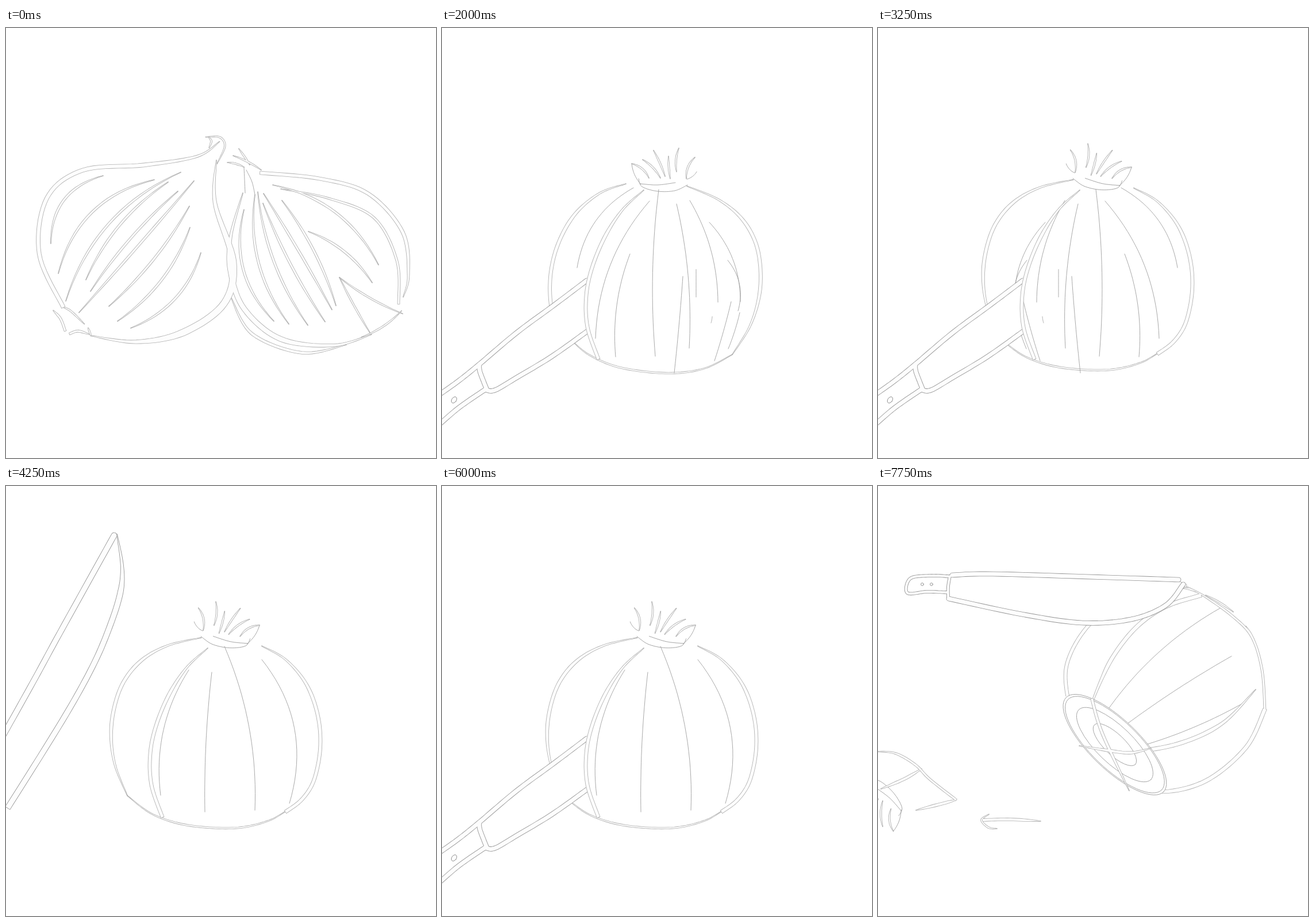
Recreate the animation shown at these times as an HTML page. Size 748 by 748 pixels, loop 8000 ms.

```html
<!DOCTYPE html>
<html lang="en">
<head>
<meta charset="utf-8">
<title>Cutting an onion</title>
<style>
html, body { margin: 0; width: 100%; height: 100%; overflow: hidden; background: #fff; }
svg { display: block; width: 100vw; height: 100vh; }
path, ellipse { fill: none; stroke-linejoin: round; stroke-linecap: round; }
.line { stroke: #a0a0a0; stroke-width: .9; }
.edge { stroke: #b0b0b0; stroke-width: 1.7; }
.skin { fill: #fdfdfd; }
.steel .line { stroke: #8c8c8c; }
.steel .edge { stroke: #939393; }
.body { fill: #fff; }
</style>
</head>
<body>
<svg id="stage" viewBox="0 0 748 748"></svg>
<script>
const stage = document.getElementById('stage');
const groups = {};
const STEP = 250, LOOP = 8000;

function parse(text) {
  const n = text.split(' ').map(Number), pts = [];
  for (let i = 0; i < n.length; i += 2) pts.push([n[i], n[i + 1]]);
  return pts;
}

// Catmull-Rom samples through a few key points
function curve(text) {
  const p = parse(text), out = [], last = p.length - 1;
  for (let i = 0; i < last; i++) {
    const a = p[Math.max(0, i - 1)], b = p[i], c = p[i + 1], d = p[Math.min(last, i + 2)];
    for (let k = 0; k < 10; k++) {
      const t = k / 10;
      out.push([0, 1].map(j => b[j] + .5 * t * (c[j] - a[j] +
        t * (2 * a[j] - 5 * b[j] + 4 * c[j] - d[j] + t * (3 * (b[j] - c[j]) + d[j] - a[j])))));
    }
  }
  return out.concat([p[last]]);
}

// chord bent sideways by a share of its length
function bend(text, bow) {
  const [[x, y], [u, v]] = parse(text), out = [];
  for (let k = 0; k <= 20; k++) {
    const t = k / 20, off = 4 * bow * t * (1 - t);
    out.push([x + (u - x) * t + (v - y) * off, y + (v - y) * t - (u - x) * off]);
  }
  return out;
}

const toPath = pts => 'M' + pts.map(p => p[0].toFixed(1) + ' ' + p[1].toFixed(1)).join('L');

// ends: 's' narrows the start, 'e' the end
function ribbon(pts, width, ends) {
  const n = pts.length - 1, left = [], right = [];
  pts.forEach((p, i) => {
    const a = pts[Math.max(0, i - 1)], b = pts[Math.min(n, i + 1)];
    const dx = b[0] - a[0], dy = b[1] - a[1], len = Math.hypot(dx, dy) || 1;
    let r = (width - 1) / 2;
    if (ends.includes('s')) r *= Math.min(1, i / n * 3);
    if (ends.includes('e')) r *= Math.min(1, (n - i) / n * 3);
    left.push([p[0] - dy / len * r, p[1] + dx / len * r]);
    right.unshift([p[0] + dy / len * r, p[1] - dx / len * r]);
  });
  return toPath(left.concat(right)) + 'Z';
}

// all edges lie under all skins, so bands that touch flow together
function group(name, draw, cls = '') {
  const layer = { body: '', line: '', edge: '', skin: '' };
  let turn = '';
  const put = (kind, d, style = '') =>
    layer[kind] += `<path class="${kind}" d="${d}" transform="${turn}" style="${style}"/>`;
  const strip = (pts, width, ends) => {
    const d = ends ? ribbon(pts, width, ends) : toPath(pts);
    put('edge', d, ends ? '' : `stroke-width:${width + .7}`);
    put('skin', d, ends ? '' : `fill:none;stroke:#fdfdfd;stroke-width:${width - 1}`);
  };
  const g = {
    body: d => put('body', `M${d}Z`),
    line: (...all) => all.forEach(t => put('line', toPath(curve(t)))),
    band: (width, ends, ...all) => all.forEach(t => strip(curve(t), width, ends)),
    // the bow runs evenly from the first rib to the last
    fan: (width, from, to, ...all) => all.forEach((t, i) => {
      const pts = bend(t, from + (to - from) * i / Math.max(1, all.length - 1));
      if (width) strip(pts, width, 'se');
      else put('line', toPath(pts));
    }),
    ring: (x, y, rx, ry, tilt = 0) => layer.line +=
      `<ellipse class="line body" rx="${rx}" ry="${ry}" transform="translate(${x} ${y}) rotate(${tilt})"/>`,
    at: (transform, part) => { turn = transform; part(g); turn = ''; }
  };
  draw(g);
  stage.insertAdjacentHTML('beforeend', `<g class="${cls}">${Object.values(layer).join('')}</g>`);
  groups[name] = stage.lastElementChild;
}

function bulb(g) {
  g.band(7, 's', '428 164 405 205 330 261 240 318 207 390 240 482 320 545');
  g.band(12, 'se', '438 195 470 262 545 338 565 410 525 488 460 540 385 567');
  g.band(3, 'se', '403 168 425 157 440 167 442 200', '408 166 415 170 417 182',
    '320 545 335 545 366 554', '375 557 386 567');
  g.band(4, 's', '307 558 325 565 342 580', '382 566 362 570 351 581');
}

function crown(g) {
  g.line('342 262 348 276 375 284 405 283 427 273', '345 271 375 273 406 269');
  g.fan(3, .12, -.12, '330 236 360 261', '349 229 380 261', '368 213 388 258',
    '394 223 397 262', '412 209 408 250', '440 225 425 262');
  g.fan(0, -.08, .1, '330 236 346 272', '443 250 426 263');
}

function shell(g) {
  g.band(6, 's', '320 271 275 287 232 323 203 373 189 428 190 485 205 522 229 548');
  g.band(6, 'se', '426 275 480 298 520 330 545 372 554 420 551 470 535 520 505 568');
  g.band(3, 'se', '229 547 255 568 300 588 355 598 410 600 460 591 505 568');
  crown(g);
}

function ribs(g) {
  g.fan(0, -.12, .13, '333 278 235 417', '361 301 267 540', '327 393 302 572', '377 281 371 571',
    '419 432 404 600', '408 306 430 557', '431 300 480 477', '465 338 519 476', '497 404 515 492');
  g.fan(0, 0, .03, '442 420 442 468', '503 476 474 579', '518 495 498 558', '470 502 468 513');
}

group('pair', g => {
  g.at('translate(375 195) rotate(27.5) translate(-430 -160)', bulb);
  g.fan(4, -.19, .12, '169 257 78 375', '258 264 91 427', '304 251 104 475', '282 268 139 438',
    '299 284 147 458', '327 266 127 495', '319 310 179 484', '320 347 194 510', '339 391 217 522');
  g.band(9, 'se', '412 287 391 362 390 420 414 488 478 541 570 552 636 533');
  g.band(5, 'se', '391 468 428 532 515 565 592 551');
  g.band(6, 'e', '442 252 545 262 630 288 690 355 700 430 691 468');
  g.band(4, 's', '478 280 560 296 640 330 680 405 683 480');
  g.fan(4, -.14, .12, '414 316 466 510', '433 290 492 515', '438 285 525 517', '447 305 555 511',
    '448 288 567 490', '480 300 574 483', '526 354 637 443', '464 273 648 412');
  g.fan(3, .06, -.06, '385 234 414 242', '395 222 444 247', '405 210 424 238',
    '580 434 633 530', '580 434 690 497', '618 538 688 492');
  g.line('414 242 416 287', '418 247 428 268 433 290');
});

group('smear', g => {
  g.line('448 177 500 181 600 179 748 181', '415 571 425 568 475 569 600 556 748 544');
  g.fan(0, 0, .08, '533 213 550 516', '608 238 606 523', '723 221 740 490', '672 244 691 514');
});

group('half', g => {
  bulb(g);
  g.fan(0, -.18, .09, '368 269 241 441', '383 243 283 482', '376 310 326 499',
    '393 342 376 451', '450 317 432 497', '488 420 425 545');
});

// the other side is the same onion mirrored and leaning
group('shellA', shell);
group('shellB', g => g.at('translate(367 426) rotate(10) scale(-1 1) translate(-371 -430)', shell));
group('ribsA', ribs);
group('ribsB', g => g.at('translate(756 0) scale(-1 1)', ribs));
group('ribsC', g => g.fan(0, -.09, .13, '318 320 269 538', '358 324 346 567', '380 279 433 564', '445 302 493 552'));

group('knifeIn', g => {
  g.body('-5 637L66 585 130 528 252 437 252 530 92 630 75 628 -5 690');
  g.band(8, '', '-5 638 30 613 66 584 130 530 195 482 252 439', '65 585 66 598 78 629',
    '75 629 92 630 130 608 190 572 252 528', '-5 690 30 660 75 629');
  g.ring(21, 647, 4, 6, 35);
}, 'steel');

group('seam', g => g.band(6, 's', '351 282 315 315 285 360 262 414 251 465 253 520 272 576'));

group('turn', g => {
  g.band(8, 's', '459 144 425 163 385 168 350 157 335 130 340 102 355 90 378 87');
  g.band(5, '', '375 74 400 96', '400 96 370 106');
});

group('ball', g => {
  g.band(6, '', '534 173 515 169 470 180 410 205 360 250 330 305 328 355 345 423');
  g.band(4, 's', '530 172 565 190 615 225 650 262 668 320 673 390');
  g.band(7, 'e', '673 388 640 455 570 513 490 532 421 514', '562 190 500 210 450 245 410 295 385 345 363 402');
  g.band(7, 'se', '388 453 455 460 530 446 600 412 657 354');
  g.fan(3, .03, .08, '570 190 618 219', '640 244 659 286', '530 178 552 184');
  g.fan(0, -.06, .03, '596 212 389 405', '615 296 433 414', '640 375 452 454');
  g.fan(0, -.04, -.08, '472 230 408 293');
});

const tipped = 'translate(291 462) rotate(-136) translate(-440 -225)';
group('crown', g => g.at(tipped, crown));

group('face', g => {
  g.body('322 366L328 366 497 531 480 545 420 550 300 470');
  for (const size of [1, .96, .74, .42]) g.ring(412, 450, 118 * size, 43 * size, 44);
  g.band(5, 'e', '372 370 390 430 437 530');
  g.band(5, 'se', '350 452 400 460 440 464 475 456');
});

group('knifeUp', g => {
  g.body('188 85L95 250 -5 435 -5 570 98 408 151 313 181 243 199 185 202 140');
  g.band(10, '', '188 86 94 255 47 341 -5 434');
  g.band(10, 's', '193 84 202 140 199 185 181 243 151 313 98 408 3 560');
}, 'steel');

function slicer(g) {
  g.body('124 155L515 161 530 170 500 208 440 232 355 238 250 223 122 195 51 186 55 160');
  g.band(8, '', '129 155 200 153 400 159 523 163', '123 196 250 223 355 238 440 232 500 208 531 171');
  g.band(5, '', '125 157 122 175 122 195', '122 157 90 156 56 161 51 186 85 184 120 185');
  for (const x of [77, 93]) g.ring(x, 171, 2.4, 2.4);
}
group('slicer', slicer, 'steel');
group('chop', g => g.at('translate(480 530) rotate(44) translate(-530 -170)', slicer), 'steel');

group('tip', g => {
  g.band(6, 's', '355 97 315 105 270 140 245 185 237 235');
  g.band(4, 'se', '210 201 220 225 233 239 248 235 264 218');
});

group('piece', g => {
  g.band(4, 's', '-5 462 30 465 65 485 90 510 136 546');
  g.band(5, 'se', '136 546 110 553 66 564', '76 492 45 510 5 527');
  g.at('translate(-351 70) ' + tipped, crown);
});

group('push', g => {
  g.band(5, 's', '283 583 230 580 182 581');
  g.band(3, 'se', '193 571 180 581 192 594 207 596');
});

// one pose per step; name@x,y moves a part
const poses = ['pair', 'pair@170,0', 'half@280,0 smear@280,0', 'half smear',
  'shellA@0,-117 ribsA@0,-117 seam@0,-117', 'shellA ribsA seam'];
const sides = ['shellA ribsA seam', 'shellB ribsB seam', 'shellB ribsC seam', 'shellB ribsC seam'];
sides.forEach((side, i) => {
  poses.push(i ? sides[i - 1] + ' knifeUp turn' : side + ' knifeUp@0,-21');
  for (const knife of ['Up', 'In', 'In', 'Up']) poses.push(`${side} knife${knife}`);
});
poses.push('ball crown knifeUp', 'ball crown knifeUp tip', 'ball crown knifeUp', 'ball crown chop',
  'ball face slicer@0,-102 piece push', 'ball face slicer piece push');

let shown = -1;
function draw(time) {
  const step = Math.floor(time % LOOP / STEP);
  if (step === shown) return;
  shown = step;
  for (const name in groups) groups[name].setAttribute('display', 'none');
  for (const part of poses[step].split(' ')) {
    const [name, move = '0,0'] = part.split('@');
    groups[name].setAttribute('display', 'inline');
    groups[name].setAttribute('transform', `translate(${move})`);
  }
}

const start = performance.now();
function tick() {
  draw(performance.now() - start);
  requestAnimationFrame(tick);
}
tick();
</script>
</body>
</html>
```
